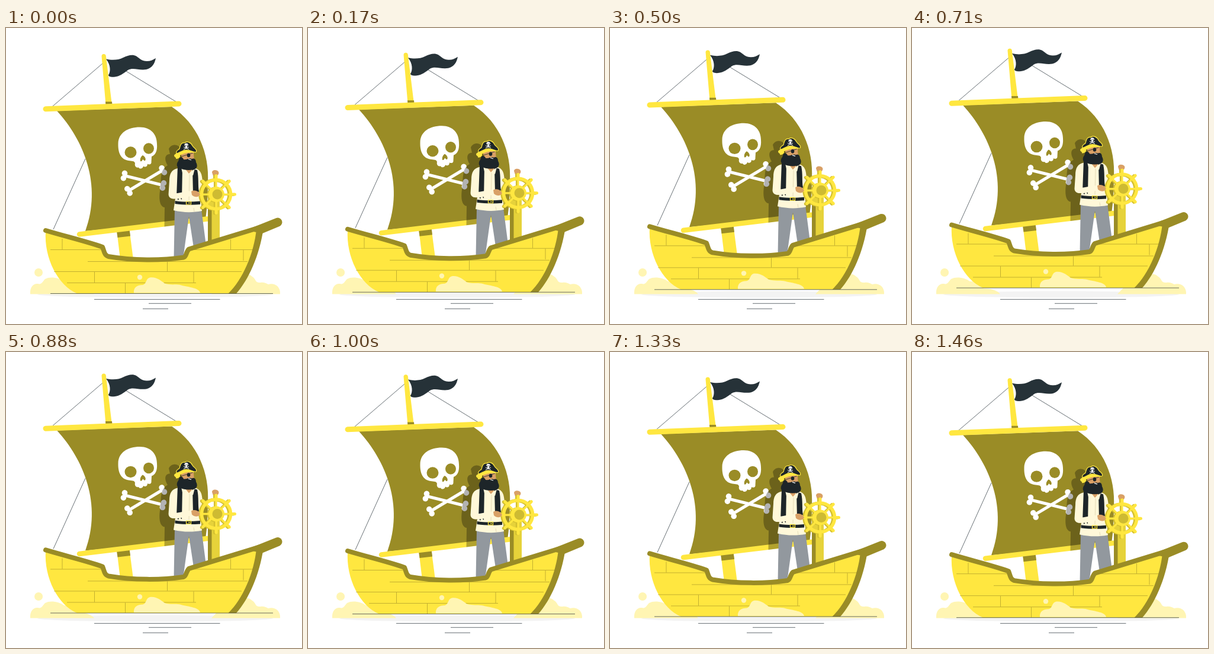
Write an HTML page that moves like this. It is 500 px wide and 500 px high and loops after 1500 ms.

```html
<!DOCTYPE html>
<html lang="en">
<head>
<meta charset="utf-8">
<title>Pirate ship</title>
<style>
  html, body { margin: 0; height: 100%; overflow: hidden; background: #fff; }
  svg { display: block; width: 100vw; height: 100vh; }
  .yellow { fill: #ffe740; }
  .olive { fill: #9a8c26; }
  .dark { fill: #263238; }
  .black { fill: #1d2529; }
  .skin { fill: #d9a066; }
  .foam { fill: #fff5b3; }
  .shirt { fill: #fff8d9; }
  .gray { fill: #92989e; }
  .white { fill: #fff; }
  .line { fill: none; stroke: #263238; stroke-width: .7; }
  .bar { fill: none; stroke: #ffe740; stroke-linecap: round; }
  .plank { fill: none; stroke: #9a8c26; stroke-width: .6; }
</style>
</head>
<body>
<svg viewBox="0 0 500 500">
  <defs>
    <g id="bone">
      <path d="M-32 0H32" stroke="#fff" stroke-width="5.200"/>
      <g class="white">
        <circle cx="-34" cy="-4" r="4.800"/><circle cx="-34" cy="4.500" r="4.800"/>
        <circle cx="34" cy="-4" r="4.800"/><circle cx="34" cy="4.500" r="4.800"/>
      </g>
    </g>
    <g id="wheel" fill="none" stroke-linecap="round">
      <circle r="24.500" stroke-width="5.500"/>
      <circle r="10" stroke-width="6"/>
      <g id="spokes"></g>
    </g>
  </defs>

  <!-- Sea -->
  <ellipse cx="252" cy="450" rx="199" ry="5.500" fill="#f3f3f3"/>
  <g class="foam">
    <path d="M41 449.500C40 438 46 431 54 432C60 434 62 428 66 424C75 419 90 422 98 428C112 428 117 436 121 440C135 440 145 444 149 449.500Z"/>
    <circle cx="55" cy="413" r="7"/>
    <path d="M347 449.500L358 438L390 424C396 416 409 412 416 420C423 424 420 431 430 430C435 429 439 431 443 433C455 430 464 438 463 449.500Z"/>
  </g>
  <path class="line" d="M149 458.400H361.500M241 465.300H313M231 474.300H274"/>

  <g id="ship">
    <!-- Rigging and sail -->
    <path class="line" d="M163 60L79 132M203 73L288 125M134 221L80 340"/>
    <path class="yellow" d="M161.500 47.500A3.700 3.700 0 0 1 168.800 47L179 130H168.500Z"/>
    <path class="olive" d="M168 124.500H179L179.500 130H168.500Z"/>
    <path class="dark" d="M169 52.500C180 55 190 54 198 50C206 46 214 44 220 47.500C227 52 229 56 238 56C244 56 248 54 253 51C251 61 246 68 237 70C224 72 215 66 206 71C198 77 192 81.500 184 82.500C178 83.500 173 82 173 79.500C177 74 177 62 169 52.500Z"/>
    <path class="yellow" d="M187 341H208.500L215 391H193Z"/>
    <path class="olive" d="M187 343L208.500 340L210 351.500L188.500 354Z"/>
    <path class="olive" d="M86 140L280 133C324 162 344 212 341 262Q341 295 337 323L134 343C163 265 131 189 86 140Z"/>
    <path class="bar" stroke-width="9" d="M67 136.700L292 128"/>
    <path class="bar" stroke-width="8.500" d="M124 348.500L340 322.500"/>

    <!-- Skull and bones -->
    <path class="white" d="M189.500 195C190 177 206 167.500 226 167.500C245 167.500 255 180 255 196C256 208 252 215 246 217L245.500 226C246 231 241 231 239 229.500C239 235 234 235.500 232 233.500C231 238.500 225 238.500 224 235.500C219 237 217 232 218 228.500C217 224 212 225 207 224C194 222 189 211 189.500 195Z"/>
    <g class="olive">
      <ellipse cx="210.500" cy="210" rx="10" ry="9.700"/>
      <ellipse cx="241" cy="203.500" rx="9" ry="9.300"/>
      <path d="M231 215C235 217 237 222 235 224C233 225 232 222 231 222C230 224 229 226 227 225C226 221 228 217 231 215Z"/>
    </g>
    <use href="#bone" transform="translate(232.500 257.500) rotate(14)"/>
    <use href="#bone" transform="translate(236 257.500) rotate(-31)"/>
    <path opacity=".3" d="M275 204C279 196 288 196 292 200L302 215V331L267.500 335.500L268 303C260 302 258 290 260 275C263 255 259 240 273 232C267 222 268 213 277 213Z"/>

    <!-- Pirate -->
    <path class="gray" d="M285 306H309V318L299 390H283.500ZM306 306H330L338 368L318 378L309 318Z"/>
    <path class="shirt" d="M290 237C280 239 276 246 276 258L274.500 281C275 288 281 289 286 288L283 308C300 312 315 312 331 309L328 276L332 260C331 246 329 240 320 237Z"/>
    <path class="black" d="M290 233L298 237L297 290L293 286L291 291L288 286ZM315 238L323 240C326 253 324 267 326 276L323 281L320 277L316 281ZM285.500 292C299 294 313 294 328 292.500V298C314 299 299 299 285.500 297Z"/>
    <path fill="none" stroke="#ffe740" stroke-width="1.200" d="M304.500 293H312.500V298H304.500ZM308 295.500H311"/>
    <path fill="none" stroke="#d8cfa8" stroke-width=".7" d="M310 247L309 291M317 304L318 310M279 283C288 283 295 278 302 279"/>
    <path class="skin" d="M301 236H318L309 246Z"/>
    <path class="shirt" d="M296 236L308 246L299 249ZM319 237L310 246L316 249Z"/>
    <path class="shirt" d="M275 279C288 281 302 276 313 275L315 283C303 286 291 290 280 288Z"/>

    <path class="skin" d="M296 211L317 208C317 213 317 217 318 221L316 229H299Z"/>
    <path class="black" d="M293 219C296 217 299 219 300 222C306 223 309 219 314 221C318 219 321 222 321 227C324 232 323 237 318 239C309 241 300 240 294 237C287 236 288 228 291 225Z"/>
    <path class="skin" d="M295.500 214.500a3 3 0 1 1 3 5z"/>
    <path fill="none" stroke="#1d2529" stroke-width=".8" d="M297 217L316 211"/>
    <ellipse class="black" cx="308.500" cy="215" rx="2.800" ry="3.300"/>
    <path fill="none" stroke="#fff" stroke-width="1.200" d="M308 221.500L313 223"/>
    <path class="yellow" d="M289 211C298 207 309 204 317 206V211C308 209 300 212 294 215C295 219 291 221 287 221C288 218 284 219 284 215C286 212 287 213 289 211Z"/>
    <path class="black" stroke="#ffe740" stroke-width="1.200" d="M288 212C286 207 291 206 293 204C295 196 297 193 302 194C306 190 313 194 315 199C317 203 323 204 321.500 209C318 212 314 206 305 206C297 206 294 211 288 212Z"/>
    <g class="white">
      <path d="M301.300 198C301.300 193.500 308 193.500 308 198L306 200V202H303V200Z"/>
      <path d="M300 201L309 205M309 201L300 205" stroke="#fff" stroke-width="1"/>
    </g>
    <g class="black"><circle cx="303.300" cy="198.500" r=".8"/><circle cx="306" cy="198" r=".8"/></g>

    <!-- Helm -->
    <path fill="#e6d23a" d="M341 282H361V362H341Z"/>
    <path class="olive" d="M341 302L347.500 308V362H341Z"/>
    <path class="skin" d="M348 244C348 239 357 239 359 243C361 247 356 252 350 250Z"/>
    <use href="#wheel" x="352.500" y="281.500" stroke="#d4c030"/>
    <use href="#wheel" x="355" y="281" stroke="#ffe740"/>
    <circle class="yellow" cx="356.500" cy="281" r="12.500"/>
    <circle cx="357" cy="281" r="8.500" fill="#cebb32"/>
    <path class="skin" d="M313 276C318 273 322 275 325 277L328 281C326 286 319 287 314 282Z"/>

    <!-- Hull -->
    <path class="yellow" d="M67 343C100 352 135 360 163 370L172 387C215 393 262 394 301 387L309 373L432 337C424 380 404 425 376 448.500H120C88 435 64 389 67 343Z"/>
    <path class="olive" d="M423 340L435 338C428 385 410 425 389 448.500H375.500C400 425 419 380 423 340Z"/>
    <path d="M67 342C100 352 135 360 163 370C166 377 166 384 173 386C215 393 262 393 300 387.500C305 386 304 378 309 373.500L430 336.500" fill="none" stroke="#9a8c26" stroke-width="8" stroke-linecap="round" stroke-linejoin="round"/>
    <path class="olive" d="M415 337.500L456.500 321A7.500 7.500 0 0 1 462.500 334.700L433 347L418 344Z"/>
    <path class="plank" d="M75 374.500H166M310 374.500H421M138 394.500H408M81 411.500H398M103 430.500H321M95 356V374M379.500 357V374M401 375V393M272.500 395V411M149.500 412V430M201.500 431V448M317 412V430"/>
    <path class="foam" d="M216 447.500C215 438 222 434 231 434C238 432 236 423 243 421.500C254 420 262 427 268 431.500C278 435 287 432 296 434.500C309 438 327 439 328 447.500Z"/>
    <circle class="foam" cx="226" cy="421" r="4.200"/>
    <path class="line" d="M75 448.500H451"/>
  </g>
</svg>
<script>
  const LOOP = 1500, LIFT = 10, LEAD = 25;
  const ship = document.getElementById('ship');

  document.getElementById('spokes').innerHTML = Array.from({ length: 8 }, (_, i) =>
    `<g transform="rotate(${i * 45})"><path d="M10 0H26" stroke-width="3.200"/><path d="M27 0H31.500" stroke-width="5"/></g>`
  ).join('');

  // The ship rises and sinks at constant speed.
  function draw(now) {
    const phase = ((now + LEAD) % LOOP) / LOOP;
    const rise = 1 - Math.abs(1 - 2 * phase);
    ship.setAttribute('transform', `translate(0 ${0.35 - LIFT * rise})`);
  }

  const start = performance.now();
  (function tick() {
    draw(performance.now() - start);
    requestAnimationFrame(tick);
  })();
</script>
</body>
</html>
```
